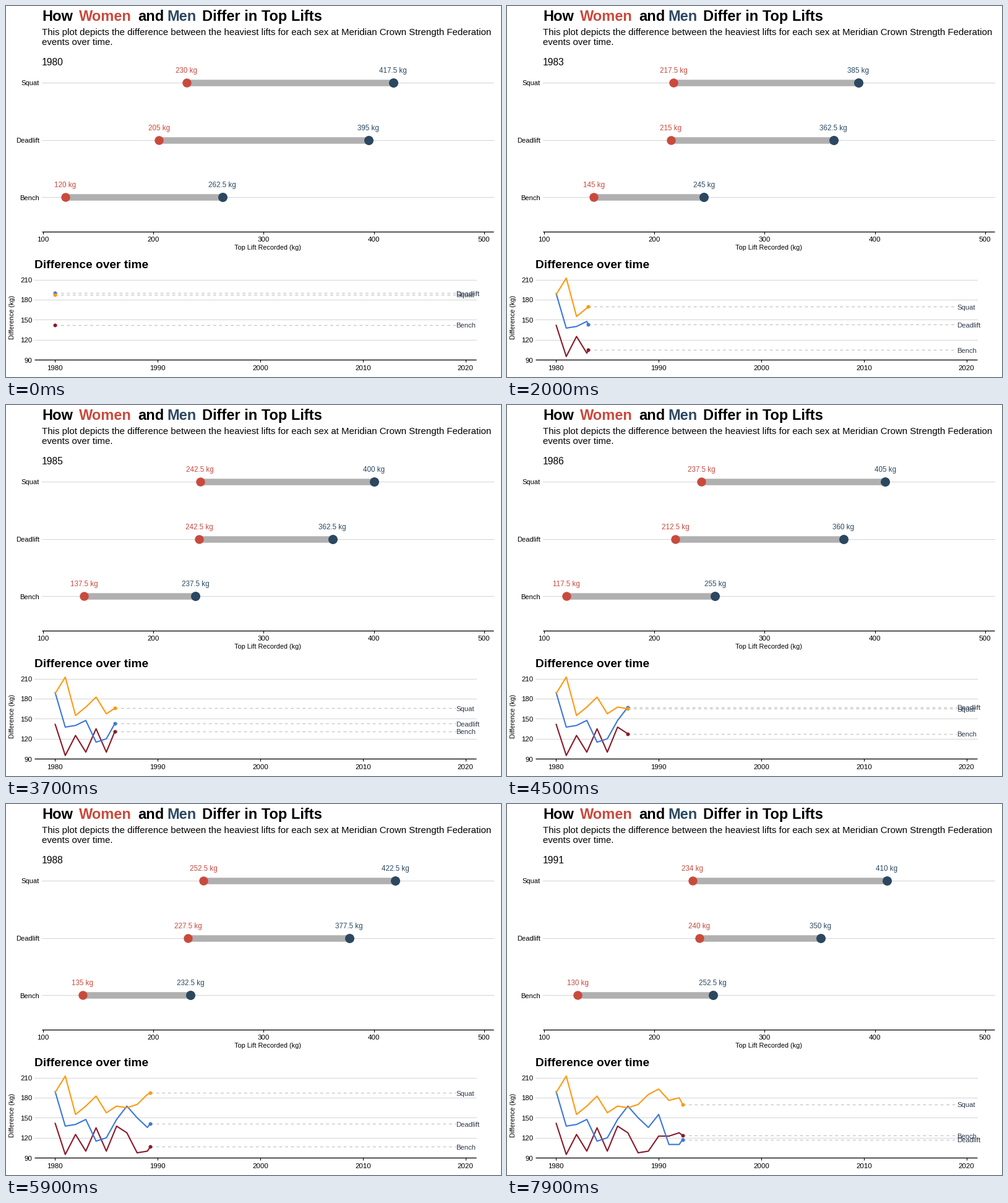
Animation of 800x600 px, one loop 8 s. Source, as a matplotlib script:

```python
import numpy as np
import matplotlib.pyplot as plt
from matplotlib.animation import FuncAnimation

plt.rcParams["font.family"] = "Liberation Sans"

W, H, DPI = 800, 600, 100
PT = 72 / DPI  # points per pixel
FRAMES, INTERVAL = 80, 100
RED, NAVY = "#c94a3d", "#2c4861"
GRID, BAR, SLATE = "#d4d4d4", "#b0b0b0", "#2f3b4d"

# Best lift per year from 1980 on: women, then men
LIFTS = {
    "Bench": (
        [120, 150, 130, 145, 137.5, 137.5, 117.5, 127.5, 135, 137.5,
         127.5, 130, 140, 140],
        [262.5, 245, 255, 245, 272.5, 237.5, 255, 255, 232.5, 237.5,
         250, 252.5, 267.5, 255]),
    "Deadlift": (
        [205, 230, 210, 215, 237.5, 242.5, 212.5, 237.5, 227.5, 242.5,
         230, 240, 260, 240],
        [395, 367.5, 350, 362.5, 352.5, 362.5, 360, 405, 377.5, 378,
         385, 350, 370, 372.5]),
    "Squat": (
        [230, 215, 212.5, 217.5, 220, 242.5, 237.5, 257.5, 252.5, 225,
         220, 234, 252.5, 250],
        [417.5, 427.5, 367.5, 385, 402.5, 400, 405, 422.5, 422.5, 410,
         413, 410, 432.5, 400]),
}
ROWS = {"Squat": 124, "Deadlift": 216.5, "Bench": 309.2}
COLORS = {"Bench": "#8b1a2b", "Deadlift": "#3c78d8", "Squat": "#ff9912"}

YEARS = np.arange(14)
KEYS = np.round(YEARS * 249 / 39)  # frame at which each year is reached


def kg_x(kg):
    return 60.2 + (kg - 100) * 1.78125


def year_x(year):
    return 79.2 + year * 16.59


def diff_y(diff):
    return 442.7 + (210 - diff) * 1.0792


def ease(t):
    return 4 * t**3 if t < 0.5 else 1 - 4 * (1 - t)**3


fig = plt.figure(figsize=(W / DPI, H / DPI), dpi=DPI, facecolor="white")
ax = fig.add_axes([0, 0, 1, 1])
ax.set_xlim(0, W)
ax.set_ylim(H, 0)
ax.axis("off")


def text(x, y, s, size, color="black", ha="left", **kw):
    return ax.text(x, y, s, fontsize=size * PT, color=color, ha=ha,
                   va="baseline", **kw)


def line(xs, ys, color, width, z=1, **kw):
    return ax.plot(xs, ys, color=color, lw=width * PT, zorder=z, **kw)[0]


def dot(color, diameter, z):
    return ax.plot([], [], "o", color=color, ms=diameter * PT, mew=0,
                   zorder=z)[0]


def draw_axis(y, x0, x1, ticks, label_y):
    line([x0, x1], [y, y], "black", 1.3, 2, solid_capstyle="butt")
    for x, name in ticks:
        line([x, x], [y, y + 4], "black", 1.1, 2, solid_capstyle="butt")
        text(x, label_y, name, 11.5, ha="center")


# Headings
for x, word, color in [(58, "How", "black"), (118, "Women", RED),
                       (213, "and", "black"), (260, "Men", NAVY),
                       (317, "Differ in Top Lifts", "black")]:
    text(x, 24, word, 23.6, color, weight="bold")
text(57.5, 47, "This plot depicts the difference between the heaviest lifts "
     "for each sex at Meridian Crown Strength Federation", 15)
text(57.5, 63, "events over time.", 15)
text(46, 424, "Difference over time", 19.2, weight="bold")
year_text = text(58, 96, "", 15.6)

# Upper chart
for name, y in ROWS.items():
    line([58, 788], [y, y], GRID, 1)
    text(54, y + 4.5, name, 11.1, ha="right")
draw_axis(364.7, 58, 788,
          [(kg_x(kg), str(kg)) for kg in range(100, 501, 100)], 381)
text(423, 394, "Top Lift Recorded (kg)", 10.9, ha="center")

# Lower chart
for diff in range(90, 211, 30):
    y = diff_y(diff)
    if diff > 90:
        line([46, 760], [y, y], GRID, 1)
    text(42.5, y + 4.3, str(diff), 11.5, ha="right")
draw_axis(572.4, 46, 760,
          [(year_x(n), str(1980 + n)) for n in range(0, 41, 10)], 589)
ax.text(15, 503.5, "Difference (kg)", fontsize=10.8 * PT, rotation=90,
        ha="right", va="center")


class Lift:
    """Moving parts of one lift in both charts."""

    def __init__(self, name, z):
        self.women, self.men = np.array(LIFTS[name], dtype=float)
        self.diff = self.men - self.women
        self.row = ROWS[name]
        self.bar = line([], [], BAR, 10.5, 3, solid_capstyle="butt")
        self.sides = [
            (values, dot(color, size, 4),
             text(0, self.row - 16, "", 11.6, color, "center"))
            for values, color, size in [(self.women, RED, 14.4),
                                        (self.men, NAVY, 15)]]
        color = COLORS[name]
        self.guide = line([], [], "#bebebe", 1.1, 4, dashes=(4.3, 4.3),
                          dash_capstyle="butt")
        self.trace = line([], [], color, 2.1, 5 + z, solid_joinstyle="round",
                          solid_capstyle="butt")
        self.tip = dot(color, 6, 8 + z)
        self.tag = text(727.5, 0, name, 11.2, SLATE, zorder=12)

    def update_bar(self, state, mix, shown):
        xs = []
        for values, marker, label in self.sides:
            x = kg_x(values[state] + mix * (values[state + 1] - values[state]))
            marker.set_data([x], [self.row])
            label.set_x(x)
            label.set_text(f"{values[shown]:g} kg")
            xs.append(x)
        self.bar.set_data(xs, [self.row] * 2)

    def update_trace(self, frame):
        x = year_x(np.interp(frame, KEYS, YEARS))
        y = diff_y(np.interp(frame, KEYS, self.diff))
        past = KEYS <= frame
        self.trace.set_data(np.append(year_x(YEARS[past]), x),
                            np.append(diff_y(self.diff[past]), y))
        self.tip.set_data([x], [y])
        self.guide.set_data([x, 727], [y, y])
        self.tag.set_y(y + 4.5)


lifts = [Lift(name, z) for z, name in enumerate(LIFTS)]


def update(frame):
    # Each year takes seven frames: two at rest, five moving to the next
    state, step = divmod(frame, 7)
    t = max(0, step - 1) / 5
    shown = state + (t > 0.5)
    year_text.set_text(str(1980 + shown))
    for lift in lifts:
        lift.update_bar(state, ease(t), shown)
        lift.update_trace(frame)
    return []


anim = FuncAnimation(fig, update, frames=FRAMES, interval=INTERVAL,
                     init_func=lambda: update(0), repeat=True,
                     repeat_delay=0, blit=False)
plt.show()
```
